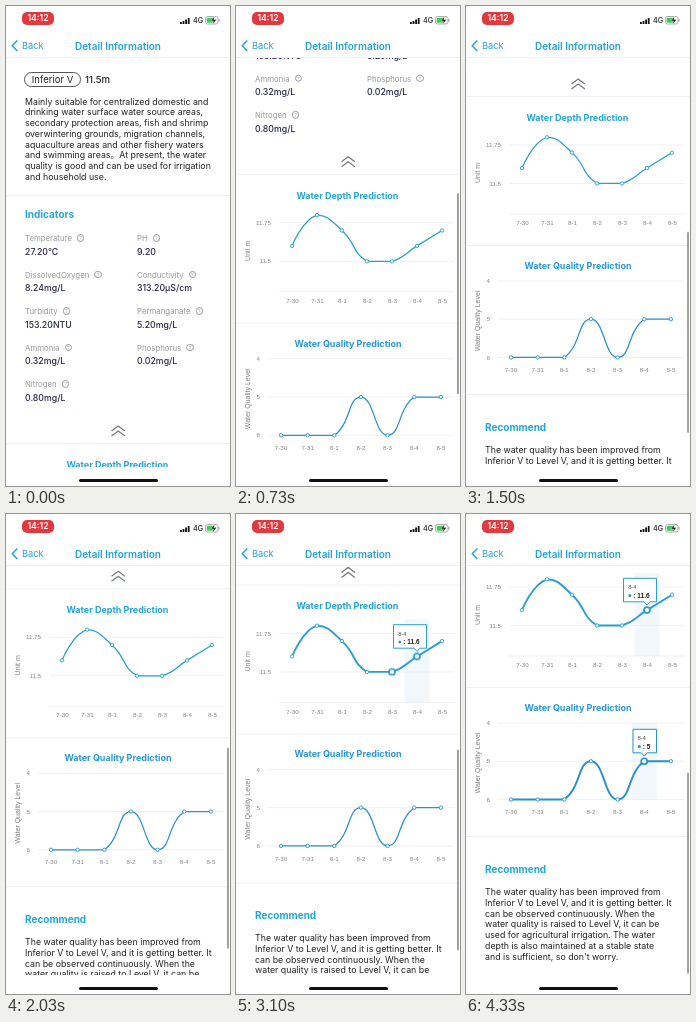
An HTML page that plays this animation: 224 px wide and 480 px high, repeating every 4.4 s.

```html
<!DOCTYPE html>
<html lang="en">
<head>
<meta charset="utf-8">
<title>Detail Information</title>
<style>
@property --s { syntax: "<number>"; inherits: true; initial-value: 0; }

html, body { margin: 0; width: 100%; height: 100%; overflow: hidden; background: #fff; }
.screen {
  position: relative; width: 224px; height: 480px; overflow: hidden; background: #fff;
  font-family: Inter, "Noto Sans CJK SC", "Noto Sans CJK", sans-serif; color: #222;
  animation: scroll 4400ms infinite;
}
.screen * { box-sizing: border-box; }
.at { position: absolute; white-space: pre; line-height: 12px; }
.view { position: absolute; top: 51px; left: 0; width: 224px; height: 410px; overflow: hidden; border-top: 1px solid #f0f0f0; }
.page { position: absolute; top: -52px; left: 0; width: 224px; height: 874px; transform: translateY(calc(var(--s) * -1px)); }
.thumb {
  position: absolute; left: 221.3px; top: 53px; width: 1.7px; border-radius: 1px; background: #a2a2a2;
  height: calc(201px - max(0, var(--s) - 413) * 1px);
  transform: translateY(calc(min(var(--s), 413) * .498px + max(0, var(--s) - 413) * 1px));
  animation: thumb 4400ms step-end infinite;
}
svg { position: absolute; left: 0; top: 0; overflow: visible; }

.clock { left: 16px; top: 6px; width: 32px; height: 12.5px; border-radius: 5px; background: #e03a40; color: #fff; font: 600 8.6px/13px Inter, sans-serif; text-align: center; }
.net { left: 187px; top: 9px; font-size: 7.2px; font-weight: 500; }
.back { left: 16px; top: 34px; font-size: 9.3px; color: #2a9fe0; }
.title { left: 0; width: 224px; top: 34px; text-align: center; font-size: 10px; font-weight: 600; color: #22a3d8; }
.home { position: absolute; left: 73px; top: 473px; width: 79px; height: 3px; border-radius: 2px; background: #111; }

.level { left: 18px; top: 66px; width: 57px; height: 15px; border: 1px solid #555; border-radius: 8px; font-size: 9.5px; line-height: 13px; text-align: center; }
.depth { left: 79px; top: 67.5px; font-size: 9.6px; font-weight: 500; }
.para { left: 19px; font-size: 8.8px; line-height: 10.75px; }
.head { left: 19px; font-size: 10px; font-weight: 700; color: #20a6d9; }
.name { left: 0; width: 223px; text-align: center; font-size: 9px; font-weight: 700; color: #22a4d8; }
.name.alt { width: 224px; color: #2796dc; }
.rule { position: absolute; left: 0; width: 224px; height: 1px; background: #f0f1f3; }
.label { font-size: 7.8px; color: #999; display: flex; align-items: center; }
.label i { margin-left: 5px; width: 7.4px; height: 7.4px; border: .7px solid #999; border-radius: 50%; font: 5px/6px Inter, sans-serif; text-align: center; }
.value { font-size: 8.75px; font-weight: 500; color: #27264f; }

.chart { font-family: "Liberation Sans", Arial, sans-serif; font-size: 6.2px; fill: #808080; }
.chart .axis { font-size: 7px; }
.grid { stroke: #ebeef1; stroke-width: .8; }
.curve { fill: none; stroke-width: 1.25; }
.dot { fill: #fff; stroke-width: .9; }
.hot { fill: #fff; stroke-width: 1.7; }
.thick1 { animation: thick1 4400ms step-end infinite; }
.thick2 { animation: thick2 4400ms step-end infinite; }
.early { animation: early 4400ms step-end infinite; }
.linger { animation: linger 4400ms step-end infinite; }
.late { animation: late 4400ms step-end infinite; }
.tap { animation: tap 4400ms step-end infinite; }

@keyframes scroll {
  0% { --s: 0; }
  2.27% { --s: 0; animation-timing-function: cubic-bezier(.33, .6, .67, .84); }
  16.59% { --s: 269; animation-timing-function: cubic-bezier(.33, .67, .67, .84); }
  34.09% { --s: 347; animation-timing-function: cubic-bezier(.33, .55, .67, .87); }
  46.14% { --s: 362.7; animation-timing-function: cubic-bezier(.33, .42, .67, 1); }
  55.68% { --s: 366.6; }
  80.45% { --s: 366.6; animation-timing-function: cubic-bezier(.3, .25, .5, 1); }
  89.32% { --s: 428; animation-timing-function: cubic-bezier(.35, .1, .4, 1); }
  97.5%, 100% { --s: 413; }
}
@keyframes thumb { 0% { opacity: 0; } 2.27%, 100% { opacity: 1; } }
@keyframes early { 0% { opacity: 0; } 66.6% { opacity: 1; } 69.3%, 100% { opacity: 0; } }
@keyframes linger { 0% { opacity: 0; } 66.6% { opacity: 1; } 72.7%, 100% { opacity: 0; } }
@keyframes late { 0% { opacity: 0; } 69.3%, 100% { opacity: 1; } }
@keyframes tap { 0% { opacity: 0; } 79.5%, 100% { opacity: 1; } }
@keyframes thick1 { 0% { stroke-width: 1.25; } 66.6%, 100% { stroke-width: 1.9; } }
@keyframes thick2 { 0% { stroke-width: 1.25; } 79.5%, 100% { stroke-width: 1.9; } }
</style>
</head>
<body>
<div class="screen">
  <div class="view">
    <div class="page" id="page">
      <div class="at level">Inferior V</div>
      <div class="at depth">11.5m</div>
      <div class="at para" style="top:90.6px">Mainly suitable for centralized domestic and
drinking water surface water source areas,
secondary protection areas, fish and shrimp
overwintering grounds, migration channels,
aquaculture areas and other fishery waters
and swimming areas。At present, the water
quality is good and can be used for irrigation
and household use.</div>
      <div class="rule" style="top:189px"></div>
      <div class="at head" style="top:202px">Indicators</div>
      <div class="rule" style="top:437px"></div>
      <div class="at name" style="top:452.5px">Water Depth Prediction</div>
      <div class="rule" style="top:586px"></div>
      <div class="at name alt" style="top:601px">Water Quality Prediction</div>
      <div class="rule" style="top:735px"></div>
      <div class="at head" style="top:762px">Recommend</div>
      <div class="at para" style="top:786.2px">The water quality has been improved from
Inferior V to Level V, and it is getting better. It
can be observed continuously. When the
water quality is raised to Level V, it can be
used for agricultural irrigation. The water
depth is also maintained at a stable state
and is sufficient, so don't worry.</div>
      <svg class="chart" id="charts" width="224" height="874">
        <path d="M105.5 425l6.7-5 6.7 5M105.5 430l6.7-5 6.7 5" fill="none" stroke="#777c82" stroke-width="1.3"/>
      </svg>
    </div>
  </div>
  <div class="thumb"></div>

  <div class="at clock">14:12</div>
  <div class="at net">4G</div>
  <div class="at back">Back</div>
  <div class="at title">Detail Information</div>
  <svg width="224" height="52">
    <path d="M174 16h1.8v2h-1.8zM176.6 15h1.8v3h-1.8zM179.2 13.5h1.8v4.5h-1.8zM181.8 12h1.8v6h-1.8z" fill="#111"/>
    <rect x="199.5" y="10.5" width="12.5" height="7.5" rx="2" fill="#fff" stroke="#999" stroke-width=".8"/>
    <rect x="200.7" y="11.7" width="7" height="5.1" rx="1" fill="#3fc95b"/>
    <path d="M213 13v2.6" stroke="#999"/>
    <path d="M208.6 10l-3.6 4.9h2.5l-.9 3.8 3.9-5.1h-2.6z" fill="#111" stroke="#fff" stroke-width=".4"/>
    <path d="M11.3 34.5l-5 5.2 5 5.2" fill="none" stroke="#2a9fe0" stroke-width="1.5"/>
  </svg>
  <div class="home"></div>
</div>

<script>
const page = document.getElementById("page");
const charts = document.getElementById("charts");
const days = ["7-30", "7-31", "8-1", "8-2", "8-3", "8-4", "8-5"];

const metrics = [
  ["Temperature", "27.20°C"], ["PH", "9.20"],
  ["DissolvedOxygen", "8.24mg/L"], ["Conductivity", "313.20µS/cm"],
  ["Turbidity", "153.20NTU"], ["Permanganate", "5.20mg/L"],
  ["Ammonia", "0.32mg/L"], ["Phosphorus", "0.02mg/L"],
  ["Nitrogen", "0.80mg/L"]
];
metrics.forEach(([label, value], i) => {
  const x = i % 2 ? 131 : 19, y = 226 + 36.5 * (i >> 1);
  page.insertAdjacentHTML("beforeend",
    `<div class="at label" style="left:${x}px;top:${y}px">${label}<i>?</i></div>
     <div class="at value" style="left:${x}px;top:${y + 13.7}px">${value}</div>`);
});

const text = (x, y, s, anchor = "middle", extra = "") =>
  `<text x="${x}" y="${y}" dy=".35em" text-anchor="${anchor}" ${extra}>${s}</text>`;

// Smooth curve whose handles stay within the height range of all points.
function smooth(pts) {
  const ys = pts.map(p => p[1]);
  const lo = Math.min(...ys), hi = Math.max(...ys);
  const handles = pts.map((p, i) => {
    const prev = pts[i - 1], next = pts[i + 1];
    if (!prev || !next) return [p, p];
    const lp = Math.hypot(p[0] - prev[0], p[1] - prev[1]);
    const ln = Math.hypot(next[0] - p[0], next[1] - p[1]);
    return [-lp, ln].map(len => {
      const k = .5 * len / (lp + ln);
      const y = p[1] + (next[1] - prev[1]) * k;
      return [p[0] + (next[0] - prev[0]) * k, Math.min(Math.max(y, lo), hi)];
    });
  });
  return pts.slice(1).reduce((d, p, i) =>
    `${d}C${handles[i][1]} ${handles[i + 1][0]} ${p}`, `M${pts[0]}`);
}

const dot = ([x, y], r, cls, color) =>
  `<circle cx="${x}" cy="${y}" r="${r}" class="${cls}" stroke="${color}"/>`;

// Tooltip box with a small arrow pointing down at the marker.
function tip(x, y, w, arrow, day, value, color) {
  const h = 23.5;
  return `<path d="M${x} ${y}h${w}v${h}H${arrow + 3}l-3 3.2l-3 -3.2H${x}z" fill="#fff" stroke="${color}" stroke-width="1" stroke-linejoin="round"/>` +
    text(x + 4.7, y + 9, day, "start", 'fill="#444" font-size="5.6"') +
    `<circle cx="${x + 6.3}" cy="${y + 17.3}" r="1.5" fill="${color}"/>` +
    text(x + 9.8, y + 17.3, ": " + value, "start", 'fill="#222" font-size="6.5" font-weight="700"');
}

function chart(o) {
  const pts = o.values.map((v, i) => [o.x0 + i * o.dx, o.y(v)]);
  const band = (i, cls) =>
    `<rect class="${cls}" x="${pts[i][0] - 12.5}" y="${o.top}" width="25" height="${o.base - o.top}" fill="#f1f7fb"/>`;
  const marks = o.hits.map(h => band(h.i, h.cls)).join("");
  const grid = o.lines.map(y => `<path class="grid" d="M${o.left} ${y}H218"/>`).join("");
  const ticks = o.ticks.map(v => text(o.left - 8, o.y(v), v, "end")).join("");
  const labels = days.map((d, i) => text(pts[i][0] + o.shift, o.labelY, d)).join("");
  const axis = text(0, 0, o.unit, "middle", `class="axis" transform="translate(12 ${o.unitY}) rotate(-90)"`);
  const curve = `<path class="curve ${o.thick}" d="${smooth(pts)}" stroke="${o.color}"/>`;
  const dots = pts.map(p => dot(p, 1.7, "dot", o.color)).join("");
  const hits = o.hits.map(h =>
    `<g class="${h.hot || h.cls}">${dot(pts[h.i], 3, "hot", o.color)}</g>
     <g class="${h.cls}">${tip(h.x, h.y, h.w, pts[h.i][0], days[h.i], o.values[h.i], o.color)}</g>`).join("");
  charts.insertAdjacentHTML("beforeend", marks + grid + ticks + labels + axis + curve + dots + hits);
}

chart({
  values: [11.6, 11.8, 11.7, 11.5, 11.5, 11.6, 11.7],
  x0: 56, dx: 25, shift: .4, left: 43, top: 472, base: 555,
  y: v => 524.5 - (v - 11.5) * 154,
  lines: [486, 524.5, 555], ticks: [11.75, 11.5], labelY: 564,
  unit: "Unit m", unitY: 514, color: "#2a9fcd", thick: "thick1",
  hits: [
    { i: 4, cls: "early", hot: "linger", x: 132.5, y: 492.7, w: 33 },
    { i: 5, cls: "late", x: 157.5, y: 477.3, w: 33 }
  ]
});
chart({
  values: [6, 6, 6, 5, 6, 5, 5],
  x0: 45, dx: 26.65, shift: 0, left: 32, top: 622, base: 698.5,
  y: v => 622 + (v - 4) * 38.25,
  lines: [622, 660.25, 698.5], ticks: [4, 5, 6], labelY: 711,
  unit: "Water Quality Level", unitY: 662, color: "#2b8fca", thick: "thick2",
  hits: [{ i: 5, cls: "tap", x: 167, y: 628.3, w: 23.5 }]
});
</script>
</body>
</html>
```
